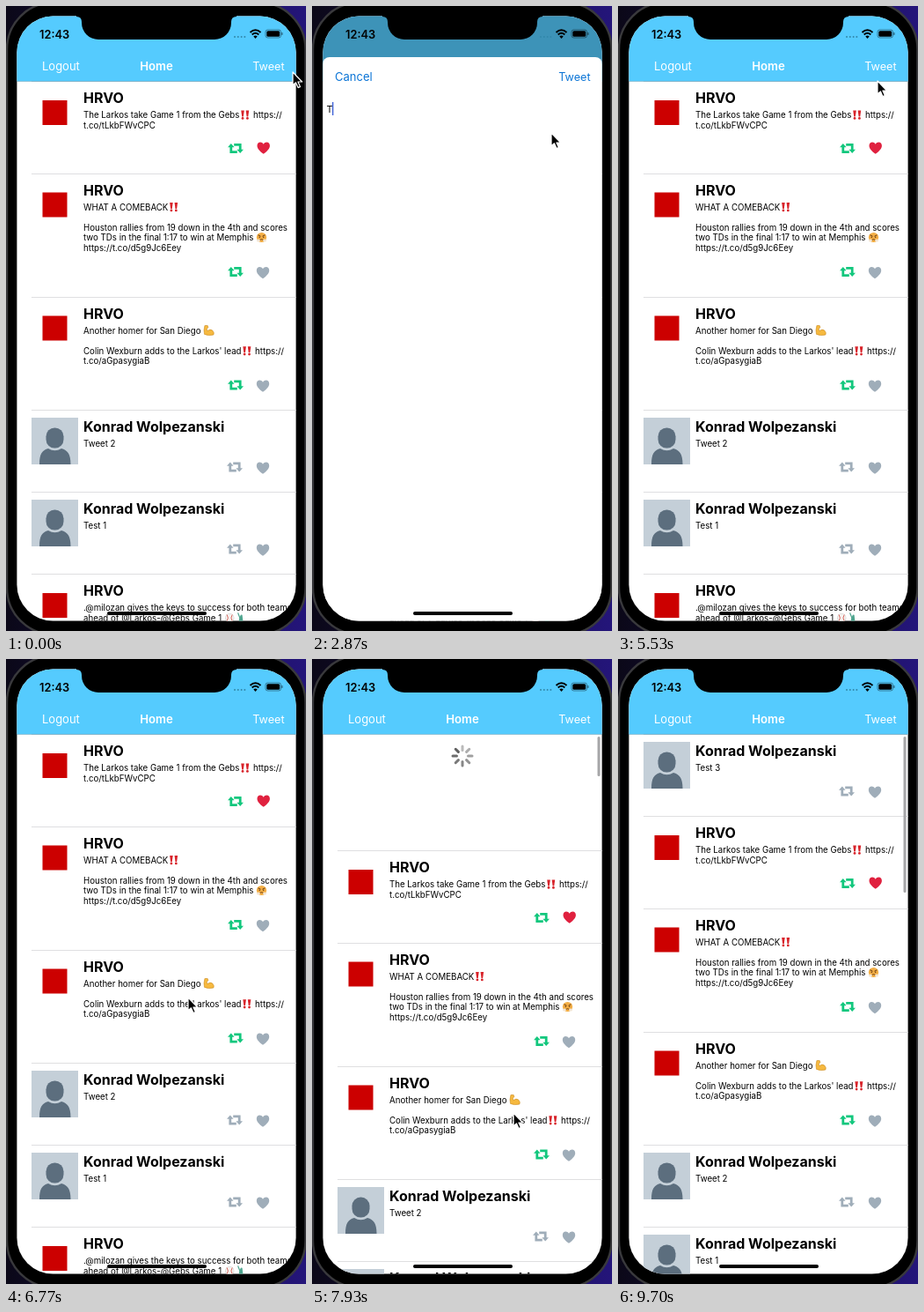
Animation of 341 by 709 pixels, one loop 9.73 s. Source, as an HTML page with a canvas:

```html
<!DOCTYPE html>
<html lang="en">
<head>
<meta charset="utf-8">
<title>Timeline</title>
<style>
  html, body { margin: 0; height: 100%; overflow: hidden; background: #000; }
  canvas { display: block; width: 341px; height: 709px; }
</style>
</head>
<body>
<canvas id="stage"></canvas>
<script>
const LOOP = 9730, W = 341, H = 709, NAV_BOTTOM = 85.5;
const SKY = '#55cbfe', GREEN = '#12c77d', GREY = '#9fadb9', RED = '#e0213f';
const LINK = '#0a74d6', LINE = '#dfdfe1';
const canvas = document.getElementById('stage');
const dpr = window.devicePixelRatio || 1;
canvas.width = W * dpr;
canvas.height = H * dpr;
const c = canvas.getContext('2d');

const clamp = (v, a = 0, b = 1) => Math.min(b, Math.max(a, v));
const easeOut = u => 1 - (1 - u) ** 2;
const progress = (t, start, length) => easeOut(clamp((t - start) / length));

// Monotone cubic interpolation of column `col` through keys of [time, ...values].
function track(keys, t, col = 1) {
  const last = keys.length - 1;
  if (t <= keys[0][0]) return keys[0][col];
  if (t >= keys[last][0]) return keys[last][col];
  const i = keys.findIndex(k => k[0] > t) - 1;
  const slope = n => n < 0 || n >= last ? 0
    : (keys[n + 1][col] - keys[n][col]) / (keys[n + 1][0] - keys[n][0]);
  const tangent = n => {
    const a = slope(n - 1), b = slope(n);
    return a * b <= 0 ? 0 : 2 * a * b / (a + b);
  };
  const d = keys[i + 1][0] - keys[i][0], u = (t - keys[i][0]) / d, v = 1 - u;
  return keys[i][col] * (1 + 2 * u) * v * v + tangent(i) * d * u * v * v
    + keys[i + 1][col] * u * u * (3 - 2 * u) - tangent(i + 1) * d * u * u * v;
}

const POINTER = [
  [0, 326, 75], [900, 299, 70], [1400, 296, 72], [1730, 281, 97], [2030, 276, 122],
  [2670, 272, 144], [4000, 272, 144], [4430, 269, 107], [4800, 297, 82], [5300, 297, 82],
  [5530, 295, 85], [6700, 207, 384], [7000, 207, 384], [7200, 211, 407], [7930, 229, 515],
  [8150, 231, 517], [9000, 231, 517], [9660, 352, 380]
];
const PULL = [
  [7000, 0], [7200, 23], [7930, 132], [8120, 134], [8450, 51], [8900, 51], [9250, 0]
];

const person = text => ({ name: 'Konrad Wolpezanski', lines: [text], height: 93 });
const channel = (height, liked, ...lines) =>
  ({ name: 'KUBO', lines, height, liked, logo: true });
const FEED = [
  channel(104.5, true, 'The Larkos take Game 1 from the Gebs‼ https://', 't.co/tLkbFWvCPC'),
  channel(140, false, 'WHAT A COMEBACK‼', '', 'Houston rallies from 19 down in the 4th and scores',
    'two TDs in the final 1:17 to win at Memphis 😤', 'https://t.co/d5g9Jc6Eey'),
  channel(128.5, false, 'Another homer for San Diego 💪', '',
    "Colin Wexburn adds to the Larkos' lead‼ https://", 't.co/aGpasygiaB'),
  person('Tweet 2'),
  person('Test 1'),
  channel(140, false, '.@milozan gives the keys to success for both teams',
    'ahead of @Larkos-@Gebs Game 1 ⚾🗽')
];
FEED.filter(row => row.logo).forEach(row => { row.name = 'HRVO'; });
const POSTED = person('Test 3');

function at(x, y, draw) {
  c.save();
  c.translate(x, y);
  draw();
  c.restore();
}
function text(str, x, y, size, color = '#000', weight = 400, align = 'left') {
  c.font = `${weight} ${size}px Inter, "Noto Sans", sans-serif`;
  c.fillStyle = color;
  c.textAlign = align;
  c.fillText(str, x, y);
}
function box(x, y, w, h, color, r = 0) {
  c.fillStyle = color;
  c.beginPath();
  c.roundRect(x, y, w, h, r);
  c.fill();
}
function shape(d, fill, stroke, width = 1) {
  const p = new Path2D(d);
  if (fill) { c.fillStyle = fill; c.fill(p); }
  if (stroke) { c.strokeStyle = stroke; c.lineWidth = width; c.stroke(p); }
}
function disc(x, y, rx, ry, color) {
  c.fillStyle = color;
  c.beginPath();
  c.ellipse(x, y, rx, ry, 0, 0, 7);
  c.fill();
}
const separator = y => box(29, Math.floor(y), 301, 1, LINE);

const EMOJI = {
  '‼'() {
    for (const x of [-2.7, 2.7]) {
      shape(`M${x - 1.8} -5H${x + 1.8}L${x + .8} 2H${x - .8}Z`, '#d8232a');
      disc(x, 3.9, 1.4, 1.4, '#d8232a');
    }
  },
  '😤'() {
    disc(0, -.3, 5.6, 5.6, '#f3ae45');
    shape('M-4 -3L-1 -1.6M4 -3L1 -1.6M-2 2.6Q0 1.2 2 2.6', null, '#6b3d12', 1);
    disc(-2.2, -.6, .8, .8, '#6b3d12');
    disc(2.2, -.6, .8, .8, '#6b3d12');
    disc(-3.6, 3.2, 2, 1.6, '#f3e6d5');
    disc(3.6, 3.2, 2, 1.6, '#f3e6d5');
  },
  '💪'() {
    shape('M-4.6 -5.4L-1.4 -5.6L-.6 -3.2L-2.4 -2L-1.6 .6Q1.6 -2.2 4.4 .2Q6.4 2.4 5.4 5Q0 6.4 -5 4.4Q-6.2 0 -4.6 -5.4Z',
      '#f6b93f', '#c98a22', .6);
  },
  '⚾'() {
    disc(0, 0, 5.2, 5.2, '#c9c9c9');
    disc(0, 0, 4.7, 4.7, '#f6f4f1');
    shape('M-3 -3.6Q-.6 0 -3 3.6M3 -3.6Q.6 0 3 3.6', null, '#d0443c', .8);
  },
  '🗽'() {
    shape('M-4 -5.5L-2.6 -5.5L-1 -1.4L0 -3.6L1.6 -3.4L2.6 5H-2.4L-1.8 0Z', '#4fa58f');
    box(-3, 4, 6, 1.8, '#b69a72');
  }
};
function richText(str, x, y) {
  for (const part of str.split(/(‼|😤|💪|⚾|🗽)/u)) {
    if (EMOJI[part]) {
      at(x + 6.3, y - 3.5, EMOJI[part]);
      x += 12.8;
    } else {
      text(part, x, y, 9.7);
      x += c.measureText(part).width;
    }
  }
}

function repost(x, y, color) {
  at(x, y, () => {
    for (let i = 0; i < 2; i++) {
      shape('M-9 -1.2L-5.2 -5.6L-1.4 -1.2Z', color);
      shape('M-5.2 -2V4.2H1.8', null, color, 2.8);
      c.rotate(Math.PI);
    }
  });
}
function heart(x, y, color) {
  at(x, y, () => shape(
    'M0 6.8C-4 4 -7.2 .6 -7.2 -2.6C-7.2 -7.2 -1.8 -7.6 0 -4.2C1.8 -7.6 7.2 -7.2 7.2 -2.6C7.2 .6 4 4 0 6.8Z', color));
}
function avatar(x, y) {
  at(x, y, () => {
    box(0, 0, 53, 53, '#c4cfd8');
    shape('M9 53C9 41 12 37 19 35Q26.5 39.5 34 35C41 37 44.500 41 44.500 53Z', '#5c6e7e');
    box(16.5, 11.5, 20, 23, '#5c6e7e', 9.8);
  });
}

function drawRow(row, y) {
  if (row.logo) box(41.5, y + 21.5, 28, 28, '#cc0000');
  else avatar(29, y + 8.5);
  text(row.name, 88, y + 24.5, 16, '#000', 700);
  row.lines.forEach((line, i) => richText(line, 88, y + 41.5 + i * 11.6));
  const bottom = y + row.height;
  repost(row.logo ? 261 : 260, bottom - 28.5, row.logo ? GREEN : GREY);
  if (row.liked) heart(292.7, bottom - 29, RED);
  else heart(292, bottom - 27.5, GREY);
  separator(bottom);
}

function spinner(t, pull) {
  const refreshing = t > 7850;
  const shown = refreshing ? 8 : Math.floor((pull - 30) / 11);
  const head = refreshing ? Math.floor(t / 100) : 7;
  at(171, 110, () => {
    c.globalAlpha = refreshing ? clamp(pull / 45) : 1;
    c.lineCap = 'round';
    for (let i = 0; i < shown; i++) {
      const shade = 95 + 13 * ((head - i + 800) % 8);
      c.save();
      c.rotate(i * Math.PI / 4);
      shape('M0 -6.5V-11', null, `rgb(${shade},${shade},${shade})`, 3);
      c.restore();
    }
  });
}

function drawHome(t) {
  box(12, 11, 318, 688, '#fff');
  const pull = track(PULL, t);
  if (pull > 30) spinner(t, pull);
  let y = NAV_BOTTOM + pull;
  separator(y);
  for (const row of t >= 8900 ? [POSTED, ...FEED] : FEED) {
    if (y < 698) drawRow(row, y);
    y += row.height;
  }
  if (t > 7030) box(324.5, 88, 3, 177 - pull, '#a6a6a8', 1.5);
  box(12, 11, 318, NAV_BOTTOM - 11, SKY);
  box(12, NAV_BOTTOM, 318, .5, 'rgba(0,0,0,.3)');
  text('Logout', 41, 72.7, 13, '#fff');
  text('Home', 171, 72.7, 13.2, '#fff', 600, 'center');
  text('Tweet', 316.5, 72.7, 12.6, '#fff', 400, 'right');
}

function drawSheet(t) {
  const open = progress(t, 1484, 520) - progress(t, 4930, 500);
  if (open <= 0) return;
  box(12, 11, 318, 688, `rgba(0,0,0,${.28 * open ** 1.6})`);
  at(0, 709 - 651 * open, () => {
    box(12, 0, 318, 720, '#fff', 8);
    text('Cancel', 26, 27.2, 13, LINK);
    text('Tweet', 316.5, 27.2, 12.6, LINK, 400, 'right');
    const typed = 'Test 3'.slice(0, clamp(Math.floor((t - 2870) / 150) + 1, 0, 6));
    text(typed, 16.5, 62.7, 10.8);
    box(16 + c.measureText(typed).width, 51, 1.4, 15, '#4164d8');
  });
}

function drawStatus() {
  text('12:43', 38, 36.5, 12.8, '#000', 600);
  for (let i = 0; i < 4; i++) disc(260 + i * 3.8, 35, 1, 1, '#3288ab');
  c.lineCap = 'butt';
  shape('M277.5 30Q283.5 24.5 289.5 30M279.7 32.5Q283.5 29 287.3 32.5', null, '#000', 2);
  shape('M281.3 34.5Q283.5 32.7 285.7 34.5L283.5 37Z', '#000');
  c.strokeStyle = 'rgba(0,0,0,.5)';
  c.lineWidth = .8;
  c.beginPath();
  c.roundRect(295, 27, 17.5, 9, 2.5);
  c.stroke();
  box(296.3, 28.3, 14.9, 6.4, '#000', 1.5);
  box(313.3, 30, 1.2, 3, 'rgba(0,0,0,.5)', .6);
}

function drawBody() {
  const glow = c.createLinearGradient(0, 0, W, 0);
  glow.addColorStop(0, '#0b0818');
  glow.addColorStop(1, '#24157a');
  c.fillStyle = glow;
  c.fillRect(0, 0, W, H);
  c.beginPath();
  c.roundRect(1, -4, 339.5, 717, 53);
  c.fillStyle = '#000';
  c.fill();
  c.strokeStyle = '#39393c';
  c.lineWidth = 2.5;
  c.stroke();
}

function draw(t) {
  c.setTransform(dpr, 0, 0, dpr, 0, 0);
  drawBody();
  c.save();
  c.beginPath();
  c.roundRect(12.4, 11.6, 317.2, 686, 41);
  c.clip();
  drawHome(t);
  drawSheet(t);
  c.restore();
  shape('M80 11V12Q86 12 86 18V19A19 19 0 0 0 105 38H237A19 19 0 0 0 256 19V18Q256 12 262 12V11Z', '#000');
  drawStatus();
  box(115, 687, 113, 4, '#000', 2);
  at(track(POINTER, t), track(POINTER, t, 2), () => {
    c.lineJoin = 'round';
    shape('M0 0V15L3.4 11.8L6 17.6L8.4 16.6L5.9 11H10.6Z', '#000', '#fff', 1.2);
  });
}

function frame() {
  draw(performance.now() % LOOP);
  requestAnimationFrame(frame);
}
frame();
</script>
</body>
</html>
```
